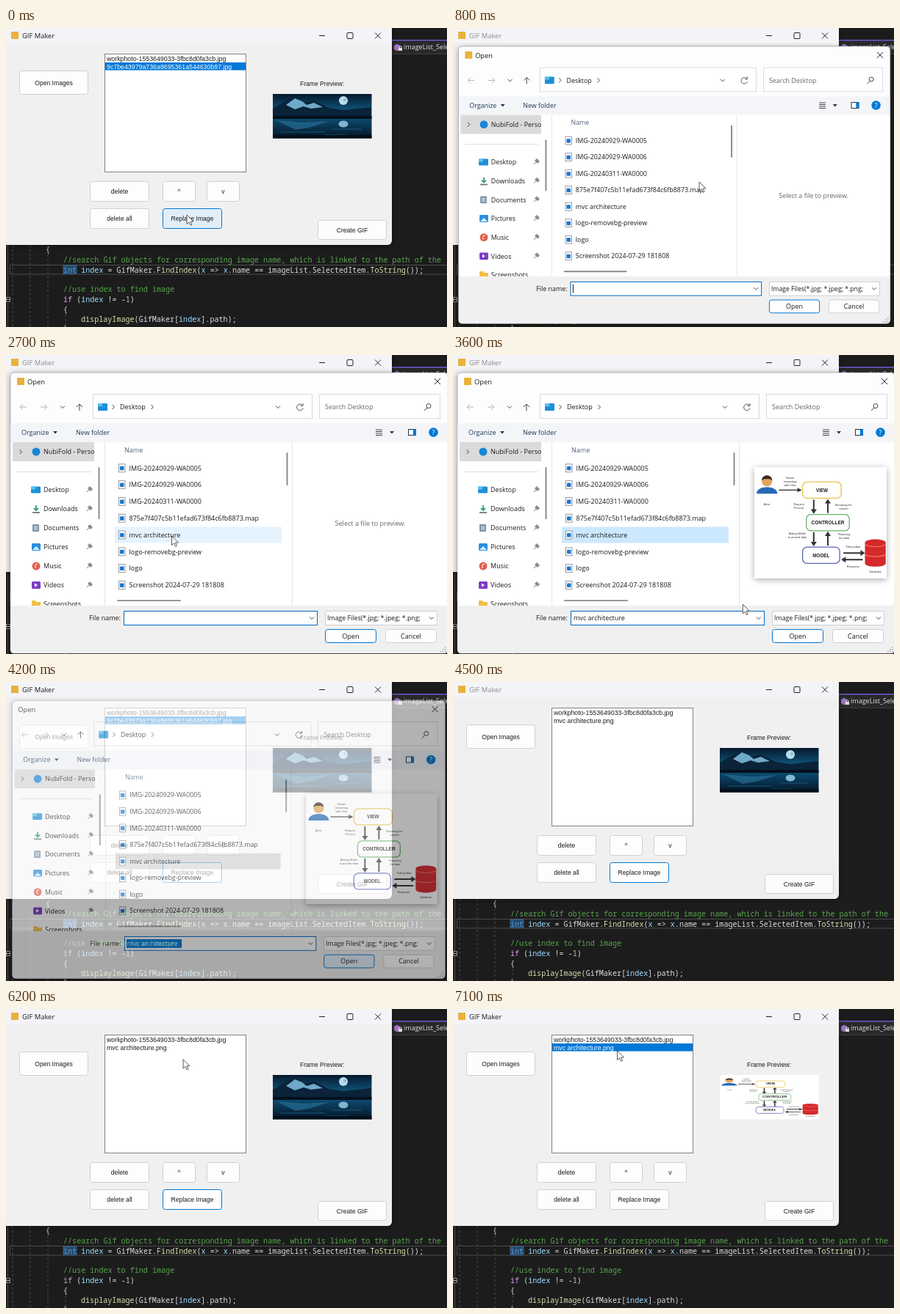
Recreate the animation shown at these times as an HTML page. Size 600 by 408 pixels, loop 7200 ms.

```html
<!DOCTYPE html>
<html lang="en">
<head>
<meta charset="utf-8">
<title>Replace image demo</title>
<style>
html, body { margin: 0; width: 100%; height: 100%; overflow: hidden; background: #1c1c1d; }
svg { display: block; width: 600px; height: 408px; }
text { white-space: pre; }
.ui { font-family: "Open Sans", "Noto Sans", sans-serif; }
.form { font-family: "Liberation Sans", sans-serif; }
.code { font-family: "Noto Sans Mono", "DejaVu Sans Mono", monospace; }
</style>
</head>
<body>
<svg id="stage" viewBox="0 0 600 408"></svg>
<script>
const BLUE = '#0078d4', INK = '#1b1b1b';

// Drawing helpers; text is placed by its vertical centre
const rect = (x, y, w, h, fill, extra = '') =>
  `<rect x="${x}" y="${y}" width="${w}" height="${h}" fill="${fill}" ${extra}/>`;
const line = (d, color = '#555', width = 1, extra = '') =>
  `<path d="${d}" fill="none" stroke="${color}" stroke-width="${width}" ${extra}/>`;
const shape = (d, fill, extra = '') => `<path d="${d}" fill="${fill}" ${extra}/>`;
const circle = (x, y, r, fill) => `<circle cx="${x}" cy="${y}" r="${r}" fill="${fill}"/>`;
const text = (x, y, str, size = 9, color = INK, cls = 'ui', extra = '') =>
  `<text class="${cls}" x="${x}" y="${y + size * .36}" font-size="${size}" fill="${color}" ${extra}>${str}</text>`;
const mid = 'text-anchor="middle"';
const group = (id, body, extra = '') => `<g id="${id}" ${extra}>${body}</g>`;
const down = (x, y) => line(`M${x - 3} ${y - 1.5}l3 3 3-3`, '#444');
const right = (x, y) => line(`M${x - 1.5} ${y - 3}l3 3-3 3`, '#444');
const cross = (x, y) => line(`M${x - 4} ${y - 4}l8 8m0-8l-8 8`, '#222');
const button = (id, x, y, w, h, label, cls = 'form', size = 8.6) =>
  rect(x + .5, y + .5, w - 1, h - 1, '#fdfdfd', `id="${id}" rx="3" stroke="#d0d0d0"`) +
  text(x + w / 2, y + h / 2, label, size, INK, cls, mid);

function codeLine(x, y, ...parts) {
  let spans = '';
  for (let i = 0; i < parts.length; i += 2) spans += `<tspan fill="${parts[i]}">${parts[i + 1]}</tspan>`;
  return text(x, y, spans, 10.08, '#dcdcdc', 'code');
}

function editor() {
  const plain = '#dcdcdc', note = '#57a64a', local = '#9cdcfe', method = '#dcdcaa', slashes = '/'.repeat(2);
  const guides = [9, 33, 57].map(x => line(`M${x} ${x > 50 ? 309 : 290}V408`, '#4a4a4a', 1, 'stroke-dasharray="3 3"')).join('');
  return rect(0, 0, 600, 408, '#1c1c1d') +
    rect(525, 17, 75, 18, '#29292b') + rect(525, 16, 75, 1.3, '#7160e8') + rect(525, 35, 75, 1, '#3d3d40') +
    shape('M528 24l4-2.5 4 2.5v5l-4 2.5-4-2.5z', '#a074c4') + rect(534, 27, 5, 4, '#ddd') +
    line('M535 27v-2h3v2', '#ddd', .9) + text(541, 26, 'imageList_Selec', 9, '#e4e4e4') +
    guides + line('M81 391V408', '#4a4a4a', 1, 'stroke-dasharray="3 3"') + line('M2.5 296V408', '#4a4a4a') +
    rect(.5, 367.5, 5, 6, '#1c1c1d', 'stroke="#888"') + line('M1 370.5h4', '#bbb') +
    rect(5.5, 323.5, 600, 12.5, 'none', 'stroke="#4b4b4b"') + rect(78, 324, 18, 11.5, '#24496e', 'stroke="#4a7fae" stroke-width=".6"') +
    codeLine(54, 302, plain, '{') +
    codeLine(78, 316, note, slashes + 'search Gif objects for corresponding image name, which is linked to the path of the') +
    codeLine(78, 330, '#569cd6', 'int ', local, 'index', plain, ' = GifMaker.', method, 'FindIndex', plain, '(', local, 'x',
      plain, ' => ', local, 'x', plain, '.name == imageList.SelectedItem.', method, 'ToString', plain, '());') +
    codeLine(78, 356, note, slashes + 'use index to find image') +
    codeLine(78, 370, '#d8a0df', 'if', plain, ' (', local, 'index', plain, ' != -', '#b5cea8', '1', plain, ')') +
    codeLine(78, 384, plain, '{') +
    codeLine(102, 397, method, 'displayImage', plain, '(GifMaker[', local, 'index', plain, '].path);') +
    codeLine(78, 410, plain, '}');
}

function nightLake() {
  return rect(363, 90, 134.5, 60.5, 'url(#night)') +
    shape('M363 110l22-13 10-2 12 7 12-3 20 10 20 3 38-4v14H363z', '#0a2338') +
    shape('M381 105l12-9 10 4 6 5 10-3 12 6-16 2-10-3-12 4z', '#6fa9c9') +
    shape('M363 120h134.5v4H363z', '#04101d') +
    shape('M368 126l38 3 34-2-28 9-18 3z', '#2a76a0', 'opacity=".6"') +
    circle(459, 99, 6, '#b9dcec') + circle(461, 98, 2, '#86b5cf') +
    `<ellipse cx="459" cy="131" rx="6.5" ry="4.5" fill="#7fb6d2"/>` +
    line('M374 142h60m10-4h40m-50 8h30', '#176489', .8) + rect(363, 146, 134.5, 4.5, '#03101c');
}

// MVC diagram on a 178 x 150 sheet
function diagram() {
  const box = (x, y, w, label, color) => rect(x, y, w, 22, '#fff', `rx="6" stroke="${color}" stroke-width="1.3"`) +
    text(x + w / 2, y + 11, label, 6.4, '#222', 'form', mid + ' font-weight="bold"');
  const up = (x, y) => line(`M${x} ${y + 18}V${y + 2}`, '#333', 2) + shape(`M${x - 4} ${y + 5}l4-6 4 6z`, '#333');
  const dn = (x, y) => line(`M${x} ${y}V${y + 15}`, '#333', 2) + shape(`M${x - 4} ${y + 13}l4 6 4-6z`, '#333');
  const tiny = (x, y, s) => text(x, y, s, 3.8, '#333', 'form', mid);
  return rect(0, 0, 178, 150, '#fff') +
    shape('M3 36c0-12 28-12 28 0z', '#2469b3') + circle(17, 19, 7, '#e0a45c') + shape('M10 18c0-9 14-9 14 0l-3-2h-8z', '#3b2b22') +
    tiny(17, 50, 'Actor') + line('M33 31H60', '#333', 1.3) + shape('M58 28l6 3-6 3z', '#333') +
    tiny(48, 14, 'Viewer') + tiny(48, 19, 'interacting') + tiny(48, 24, 'with View') +
    box(65, 20, 52, 'VIEW', '#e8c34a') + box(70, 64, 58, 'CONTROLLER', '#68b36b') + box(65, 108, 50, 'MODEL', '#5b67b8') +
    dn(80, 44) + up(99, 44) + dn(80, 88) + up(99, 88) +
    tiny(60, 50, 'Request') + tiny(60, 55, 'Process') + tiny(120, 51, 'Returning the') + tiny(120, 56, 'content') +
    tiny(58, 90, 'Asking Model') + tiny(58, 95, 'to provide data') + tiny(121, 91, 'Returning') + tiny(121, 96, 'the data') +
    line('M120 116h24M122 125h24', '#333', 2) + shape('M143 112l6 4-6 4zM123 121l-6 4 6 4z', '#333') +
    tiny(133, 108, 'Taking data') + tiny(133, 134, 'Response') +
    shape('M149 102c0-6 28-6 28 0v28c0 6-28 6-28 0z', '#d5292b') + line('M149 103c0 6 28 6 28 0m-28 14c0 5 28 5 28 0', '#f17a72', 1) +
    tiny(163, 141, 'Database');
}

function makerWindow() {
  return shape('M0 0H525V290a6 6 0 0 1-6 6H0z', '#f0f0f1', 'filter="url(#shadow)"') + rect(0, 0, 525, 21, '#f4f3f7') +
    rect(7, 5, 10, 10, '#e9b23c') + text(22, 10.5, 'GIF Maker', 9.4, INK, 'ui', 'id="makerTitle"') +
    line('M426 10.5h8', '#222') + rect(464, 6.5, 8, 8, 'none', 'stroke="#222" rx="1"') + cross(506, 10.5) +
    button('open', 18, 58, 94, 33, 'Open Images') + button('del', 114, 209, 81, 28, 'delete') +
    button('moveUp', 213, 209, 45, 28, '^') + button('moveDown', 273, 209, 45, 28, 'v') +
    button('delAll', 114, 246, 81, 28, 'delete all') + button('replace', 213, 246, 81, 28, 'Replace Image') +
    button('create', 424, 262, 94, 27, 'Create GIF') +
    rect(134.5, 35.5, 192, 161, '#fff', 'stroke="#828282"') +
    rect(135, 47, 191, 10.6, '#0078d7', 'id="pick"') +
    text(137, 42, 'workphoto-1553649033-3fbc8d0fa3cb.jpg', 8.8, INK, 'form') +
    text(137, 52.4, '', 8.8, INK, 'form', 'id="second"') +
    text(430, 75.5, 'Frame Preview:', 8.6, INK, 'form', mid) +
    group('lake', nightLake()) + group('thumb', diagram(), 'transform="translate(363 90) scale(.756 .403)"');
}

const files = ['IMG-20240929-WA0005', 'IMG-20240929-WA0006', 'IMG-20240311-WA0000', '875e7f407c5b11efad673f84c6fb8873.map',
  'mvc architecture', 'logo-removebg-preview', 'logo', 'Screenshot 2024-07-29 181808'];
const rowY = i => 154.3 + 22.8 * i;

function sidebar() {
  const screen = rect(34, -4.5, 13, 9, '#1f8fd6', 'rx="1"') + rect(34, -4.5, 6, 4, '#5cc1ee');
  const places = [
    ['Desktop', screen],
    ['Downloads', line('M41-5V2m-3-3l3 3 3-3', '#2f9e83', 1.8) + line('M36 5h10', '#777', 1.8)],
    ['Documents', rect(36, -5, 9, 10, '#7b95ad', 'rx="1"') + line('M38-2h5m-5 2h5m-5 2h5', '#fff', .8)],
    ['Pictures', rect(35, -5, 12, 10, '#2a8fe0', 'rx="1.5"') + shape('M36 4l5-5 5 5z', '#d8effb')],
    ['Music', circle(41, 0, 5.5, '#e0604f') + line('M40 3v-5l3-1', '#fff')],
    ['Videos', rect(35, -5, 12, 10, '#7c3cc4', 'rx="1.5"') + shape('M39-2.5l4 2.5-4 2.5z', '#fff')],
    ['Screenshots', shape('M35-5h5l1.5 2H47v8H35z', '#f3bf45')]
  ];
  const pin = line('M110 3l3-3', '#777') + shape('M111-2l3-3 4 4-3 3z', '#8b8b8b');
  return rect(9, 119, 111, 26, '#dadada') + right(20, 132) + circle(41, 132, 5.5, '#1787d8') +
    text(51, 132, 'NubiFold - Perso', 9) + rect(120, 119, 14, 223, '#fff') + line('M15 159.5H116', '#ddd') +
    places.map(([name, icon], i) => `<g transform="translate(0 ${184 + 26 * i})">${icon}${text(51, 0, name, 9)}${i < 6 ? pin : ''}</g>`).join('') +
    rect(125.5, 153, 2, 71, '#8b8b8b', 'rx="1"') + line('M134.5 119V342', '#e6e6e6');
}

function openDialog() {
  const page = y => rect(153.5, y - 5.5, 8.5, 11, '#fff', 'stroke="#8a8f98" stroke-width=".9"') + rect(155, y - 2.5, 5.5, 5.5, '#1877d2', 'rx="1"');
  return rect(6, 24, 595, 383, '#fdfdfe', 'rx="5" stroke="#8a8a8a" stroke-width=".6" filter="url(#shadow)"') +
    group('dialogIcon', rect(15, 31, 10, 10, '#e9b23c')) + text(29, 36.3, 'Open', 9.4, INK, 'ui', 'id="dialogTitle"') + cross(587, 36) +
    line('M28 71h-9m4-4l-4 4 4 4M47 71h9m-4-4l4 4-4 4', '#b4b4b4') + down(77, 71) + line('M100 76v-9m-4 4l4-4 4 4', '#444') +
    rect(118.5, 53.5, 298, 33, '#fff', 'stroke="#dadada"') + rect(125, 66, 13, 10, '#1f8fd6', 'rx="1"') + rect(125, 66, 6, 4, '#5cc1ee') +
    right(146, 71) + text(155, 71, 'Desktop') + right(199, 71) + down(370, 71) +
    line('M403.5 69a4.3 4.3 0 1 0 .6 3.5M404 66v3.4h-3.4', '#555') +
    rect(426.5, 53.5, 164, 33, '#fff', 'stroke="#dadada"') + text(434, 71, 'Search Desktop', 9, '#666') +
    `<circle cx="575" cy="69.5" r="3" fill="none" stroke="#444"/>` + line('M573 72l-4 4', '#444') +
    rect(6.5, 93, 594, 26, '#f3f5f9') + text(21, 105.5, 'Organize', 9, '#1e395b') + shape('M64 104h6l-3 3.5z', '#1e395b') +
    text(95, 105.5, 'New folder', 9, '#1e395b') + line('M503 102h9m-9 2.5h9m-9 2.5h9m-9 2.5h9', '#444') +
    shape('M522 104h6l-3 3.5z', '#333') + rect(547.5, 101.5, 10, 8, '#fff', 'stroke="#234"') + rect(554, 101.5, 4, 8, BLUE) +
    circle(581.5, 105.5, 6.3, BLUE) + text(581.5, 105.5, '?', 9, '#fff', 'ui', mid) +
    rect(6.5, 119, 594, 223, '#fff') + sidebar() +
    text(161, 129.5, 'Name', 9, '#4c607a') +
    rect(148, 0, 227, 22, '#e5f3ff', 'id="hover"') + rect(148, rowY(4) - 11, 227, 22, '#cce8ff', 'id="chosen"') +
    files.map((name, i) => page(rowY(i)) + text(167.5, rowY(i), name, 9)).join('') +
    rect(381.5, 133, 2, 45, '#8b8b8b', 'rx="1"') + rect(135, 329, 254, 13, '#fff') + rect(151, 334.3, 87, 1.8, '#8b8b8b', 'rx="1"') +
    line('M389.5 119V342', '#e6e6e6') +
    text(495.5, 230, 'Select a file to preview.', 9.1, '#666', 'ui', mid + ' id="hint"') +
    group('preview', rect(0, 0, 178, 150, '#fff', 'filter="url(#shadow)"') + diagram(), 'transform="translate(410 153) scale(1.01)"') +
    shape('M6.5 342H600.5V403a4 4 0 0 1-4 4H10.5a4 4 0 0 1-4-4z', '#f0f0f0') +
    text(156, 359, 'File name:', 9, INK, 'ui', 'text-anchor="end"') +
    rect(160.5, 349.5, 263, 19, '#fff', 'stroke="#0067c0"') + rect(163, 353, 76, 12, '#0078d7', 'id="nameMark"') +
    text(164, 359, 'mvc architecture', 9, INK, 'ui', 'id="fileName"') + line('M164 353v12', '#111', 1, 'id="caret"') + down(416, 359) +
    rect(434.5, 349.5, 152, 19, '#fff', 'stroke="#d0d0d0"') + text(437, 359, 'Image Files(*.jpg; *.jpeg; *.png;', 8.8) +
    rect(572, 351, 13, 16, '#fff') + down(579, 359) +
    button('accept', 434, 374, 70, 19, 'Open', 'ui', 9) + button('cancel', 516, 374, 70, 19, 'Cancel', 'ui', 9) +
    shape('M597 398h1.5v1.5H597zm0 3h1.5v1.5H597zm-3 0h1.5v1.5H594zm3 3h1.5v1.5H597zm-3 0h1.5v1.5H594zm-3 0h1.5v1.5H591z', '#a5a5a5');
}

function messageBox() {
  return rect(414.5, 242.5, 220, 105, '#fff', 'rx="5" stroke="#999" stroke-width=".6"') +
    shape('M415 314H634V343a4 4 0 0 1-4 4H419a4 4 0 0 1-4-4z', '#f0f0f0') +
    text(422, 291, 'C:\\Users\\mora\\Desktop\\mvc architecture.png', 8.8) + cross(622, 254) +
    rect(558.5, 323.5, 59, 16, '#e0eef9', `rx="3" stroke="${BLUE}"`) + text(588, 331.5, 'OK', 9, INK, 'ui', mid);
}

const stage = document.getElementById('stage');
stage.innerHTML = `<defs>
  <linearGradient id="night" x2="0" y2="1"><stop stop-color="#06192c"/><stop offset=".45" stop-color="#11608a"/>
  <stop offset=".6" stop-color="#0d4567"/><stop offset="1" stop-color="#041526"/></linearGradient>
  <filter id="shadow" x="-10%" y="-10%" width="120%" height="120%"><feDropShadow dx="0" dy="2" stdDeviation="4" flood-opacity=".35"/></filter>
  </defs>` + editor() + makerWindow() + group('dialog', openDialog()) +
  rect(414, 242, 221, 106, '#000', 'id="boxShade" rx="5"') + group('box', messageBox()) +
  group('cursor', shape('M0 0V12.5L3 9.8 5 14.2 7 13.3 5 9H9z', '#fff', 'stroke="#333" stroke-width=".8"'));

const el = {};
stage.querySelectorAll('[id]').forEach(node => el[node.id] = node);
const set = (id, name, value) => el[id].setAttribute(name, value);
const show = (id, on) => set(id, 'visibility', on ? 'inherit' : 'hidden');
const clamp = v => Math.max(0, Math.min(1, v));
const span = (t, a, b) => clamp((t - a) / (b - a));
const zoom = (s, x, y) => `translate(${x} ${y}) scale(${s}) translate(${-x} ${-y})`;

// time, x, y of the pointer tip
const route = [[0, 246, 255], [350, 246, 255], [780, 335, 210], [900, 335, 210], [1550, 225.5, 272], [2300, 225.5, 272],
  [2600, 225.5, 247], [3250, 225.5, 247], [3800, 466, 380], [4020, 466, 380], [4180, 640, 335], [5500, 640, 335],
  [6300, 223.5, 57], [7200, 223.5, 57]];

function pointer(t) {
  const i = route.findIndex(stop => stop[0] > t);
  const [t0, x0, y0] = route[i - 1], [t1, x1, y1] = route[i];
  const p = span(t, t0, t1), e = p * p * (3 - 2 * p);
  return [x0 + (x1 - x0) * e, y0 + (y1 - y0) * e];
}

function draw(t) {
  const [x, y] = pointer(t);
  set('cursor', 'transform', `translate(${x} ${y})`);

  const replaced = t >= 4500, reselected = t >= 6600, chosen = t >= 2900, closing = t >= 4100;
  const inactive = (t >= 550 && t < 4100) || (t >= 4500 && t < 5200);
  set('makerTitle', 'fill', inactive ? '#8c8c8c' : INK);
  show('pick', !replaced || reselected);
  el.second.textContent = replaced ? 'mvc architecture.png' : '9c7be43979a736a8695361a544630b97.jpg';
  set('second', 'fill', replaced && !reselected ? INK : '#fff');
  set('replace', 'fill', t < 550 ? '#e0eef9' : '#fdfdfd');
  set('replace', 'stroke', reselected ? '#d0d0d0' : BLUE);
  show('lake', !reselected);
  show('thumb', reselected);

  const opening = span(t, 550, 900), fade = span(t, 4100, 4400), open = t >= 550 && t < 4400;
  show('dialog', open);
  set('dialog', 'opacity', Math.min(1, opening * 2) * (1 - fade));
  set('dialog', 'transform', closing ? zoom(1 - .03 * fade, 250, 150) : zoom(1 - .16 * (1 - opening) ** 2, 118, 105));
  show('dialogIcon', !closing);
  set('dialogTitle', 'x', closing ? 14 : 29);
  const row = Math.round((y - rowY(0)) / 22.8);
  const shownIf = (id, on) => set(id, 'display', on ? 'inline' : 'none');
  shownIf('hover', t > 900 && x < 375 && row >= 0 && row < 8);
  set('hover', 'y', rowY(row) - 11);
  shownIf('chosen', chosen);
  set('chosen', 'fill', closing ? '#d9d9d9' : '#cce8ff');
  shownIf('preview', t >= 3000);
  shownIf('hint', t < 3000);
  shownIf('fileName', chosen);
  shownIf('nameMark', closing);
  set('fileName', 'fill', closing ? '#fff' : INK);
  shownIf('caret', t < 1200);
  set('accept', 'stroke', BLUE);
  set('accept', 'fill', t >= 3700 ? '#e0eef9' : '#fdfdfd');

  const shown = span(t, 4500, 4700) * (1 - span(t, 5190, 5430));
  show('box', shown > 0);
  set('box', 'opacity', shown);
  set('boxShade', 'opacity', Math.min(1, shown * 2) * .3);
  for (const id of ['box', 'boxShade']) set(id, 'transform', zoom(1 + .04 * (shown - .55), 525, 295));
}

const start = performance.now();
function tick() {
  draw((performance.now() - start) % 7200);
  requestAnimationFrame(tick);
}
tick();
</script>
</body>
</html>
```
